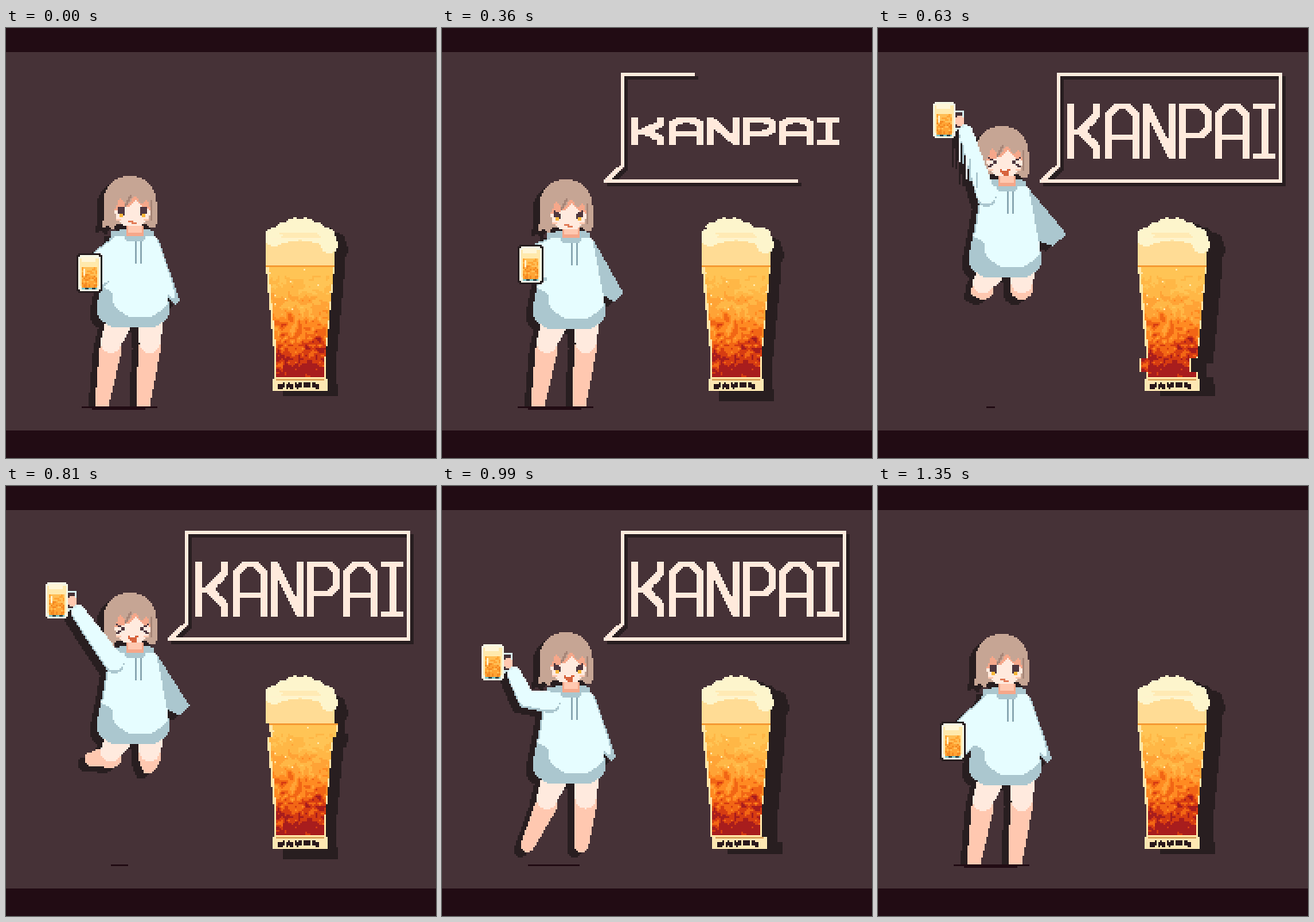
An HTML page with a canvas for the animation above (1440 ms loop, 500 px wide and 500 px high).

```html
<!DOCTYPE html>
<html lang="en">
<head>
<meta charset="utf-8">
<title>Kanpai</title>
<style>
html, body { margin: 0; width: 100%; height: 100%; overflow: hidden; background: #463237; }
canvas { display: block; width: 500px; height: 500px; image-rendering: pixelated; }
</style>
</head>
<body>
<canvas id="stage" width="250" height="250" role="img" aria-label="KANPAI"></canvas>
<script>
// Coordinates are in stage pixels; every art pixel covers 2 x 2 of them.
const STEP = 90, STEPS = 16;
const BG = '#463237', BAR = '#220c14', DARK = '#281e20', CREAM = '#ffeadc';
const SKIN = '#ffeade', BLUSH = '#ffc8b0', FLUSH = '#f5a78a', HAIR = '#c6a594', HAIR_DARK = '#a78678';
const CLOTH = '#e6fdff', FOLD = '#abc7cf', EYE = '#503840', IRIS = '#f8b73a';

const stage = document.getElementById('stage').getContext('2d');
const layer = () => {
  const c = document.createElement('canvas');
  c.width = c.height = 250;
  return c.getContext('2d');
};
const scene = layer(), tint = layer(), glass = layer();

const clamp = (v, lo = 0, hi = 1) => Math.max(lo, Math.min(hi, v));
const mix = (a, b, f) => a + (b - a) * f;

// ---- Pixel drawing ----
function box(g, color, x, y, w, h) {
  g.fillStyle = color;
  g.fillRect(Math.round(x / 2), Math.round(y / 2), Math.round(w / 2), Math.round(h / 2));
}

// Fills rows y0..y1 between left(y) and right(y).
function rows(g, color, y0, y1, left, right) {
  g.fillStyle = color;
  for (let r = Math.round(y0 / 2); r < Math.round(y1 / 2); r++) {
    const a = Math.round(left(r * 2 + 1) / 2);
    g.fillRect(a, r, Math.max(0, Math.round(right(r * 2 + 1) / 2) - a), 1);
  }
}

function disc(g, color, x, y, r) {
  const half = v => Math.sqrt(Math.max(0, r * r - (v - y) ** 2));
  rows(g, color, y - r, y + r, v => x - half(v), v => x + half(v));
}

function poly(g, color, ...p) {
  g.fillStyle = color;
  const ys = p.filter((_, i) => i % 2), n = p.length;
  for (let r = Math.floor(Math.min(...ys) / 2); r < Math.max(...ys) / 2; r++) {
    const y = r * 2 + 1, hits = [];
    for (let i = 0; i < n; i += 2) {
      const x0 = p[i], y0 = p[i + 1], x1 = p[(i + 2) % n], y1 = p[(i + 3) % n];
      if ((y0 <= y) !== (y1 <= y)) hits.push(x0 + (y - y0) / (y1 - y0) * (x1 - x0));
    }
    hits.sort((a, b) => a - b);
    for (let i = 0; i + 1 < hits.length; i += 2) {
      const a = Math.round(hits[i] / 2), b = Math.round(hits[i + 1] / 2);
      g.fillRect(a, r, b - a, 1);
    }
  }
}

// Calls put(x, y, part) along a polyline, up to the given share of its length.
function walk(p, share, put) {
  const dist = i => Math.hypot(p[i + 2] - p[i], p[i + 3] - p[i + 1]);
  let total = 0, done = 0;
  for (let i = 0; i + 3 < p.length; i += 2) total += dist(i);
  for (let i = 0; i + 3 < p.length; i += 2) {
    const d = dist(i);
    for (let s = 0; s <= d && done + s <= total * share; s++)
      put(mix(p[i], p[i + 2], s / d), mix(p[i + 1], p[i + 3], s / d), (done + s) / total);
    done += d;
  }
}
const line = (g, color, p, w, h = w, share = 1) =>
  walk(p, share, (x, y) => box(g, color, x, y, w, h));
const limb = (g, color, p, r0, r1) =>
  walk(p, 1, (x, y, f) => disc(g, color, x, y, mix(r0, r1, f)));

function shadow(src, dx, dy, limit = 500) {
  tint.globalCompositeOperation = 'copy';
  tint.drawImage(src.canvas, dx / 2, dy / 2);
  tint.globalCompositeOperation = 'source-in';
  box(tint, DARK, 0, 0, 500, 500);
  for (const c of [tint.canvas, src.canvas])
    stage.drawImage(c, 0, 0, 250, limit / 2, 0, 0, 250, limit / 2);
}

const clear = g => g.clearRect(0, 0, 250, 250);

const hash = (x, y) => {
  const s = Math.sin(x * 127.1 + y * 311.7) * 43758.5453;
  return s - Math.floor(s);
};
function noise(x, y) {
  const i = Math.floor(x), j = Math.floor(y), u = x - i;
  return mix(mix(hash(i, j), hash(i + 1, j), u), mix(hash(i, j + 1), hash(i + 1, j + 1), u), y - j);
}

// ---- Beer glass ----
function buildGlass() {
  const g = glass;
  const amber = ['#ffc455', '#ffb746', '#ffa336', '#ff8a22', '#f26615', '#d63c12', '#a81d1d'];
  const taper = y => 10 * clamp((y - 276) / 105);
  const left = y => 302 + taper(y), right = y => 382 - taper(y);

  rows(g, '#ffe6a8', 242, 408, left, right);
  rows(g, '#ffdc95', 248, 276, left, right);
  box(g, '#f59a34', 302, 276, 80, 2);
  for (let y = 278; y < 406; y += 2) {
    const v = (y - 278) / 128;
    for (let x = Math.ceil(left(y) / 2) * 2 + 2; x < right(y) - 2; x += 2) {
      const n = noise(x / 11, y / 9) * .5 + noise(x / 4, y / 4) * .5 - .5;
      const k = Math.floor((v + n * clamp(.15 + v, 0, .75)) * 7);
      const spark = v < .4 && hash(x, y) > .985;
      box(g, spark ? '#ffe6a8' : amber[clamp(k, 0, 6)], x, y, 2, 2);
    }
  }
  for (let x = 312; x < 376; x += 12)
    disc(g, '#fdf5cc', x, 234 + ((x - 342) / 10) ** 2, 14 - Math.abs(x - 342) / 10);
  disc(g, '#fdf5cc', 376, 252, 10);
  rows(g, '#ffeab4', 238, 246, y => 322 - y % 5, y => 360 + y % 7);
  box(g, '#fff3cc', 308, 244, 56, 2);

  box(g, '#fde7b2', 310, 408, 64, 14);
  box(g, '#d9a25c', 314, 408, 56, 2);
  for (let x = 316; x < 364; x += 2)
    if (x % 10 !== 4) box(g, '#2a181c', x, 412 + 2 * (hash(x, 1) > .7), 2, 6);
}

// A slipped strip runs down the glass twice per loop.
function strip(k) {
  const first = k < 8, i = k - (first ? 4 : 9);
  if (i < 0 || i > (first ? 3 : 2)) return null;
  return first ? { y: 216 + i * 56, dx: -8 } : { y: 276 + i * 66, dx: 4 };
}

function drawGlass(k) {
  clear(scene);
  scene.drawImage(glass.canvas, 0, 0);
  const s = strip(k);
  if (s) {
    scene.clearRect(0, s.y / 2, 250, 8);
    scene.drawImage(glass.canvas, 0, s.y / 2, 250, 8, s.dx / 2, s.y / 2, 250, 8);
  }
  const far = (k >> 1) % 2 === 1;
  shadow(scene, far ? 18 : 12, (k < 4) === far ? 12 : 6);
}

// ---- Speech bubble ----
const stem = x => [x, 88, x, 146];
const bar = (x, y, w) => [x, y, x + w, y];
const arch = x => [x, 146, x, 98, x + 10, 88, x + 22, 88, x + 32, 98, x + 32, 146];
const strokes = [
  stem(220), [250, 88, 250, 98, 232, 117, 250, 136, 250, 146], bar(220, 117, 12),
  arch(264), bar(264, 124, 32),
  stem(308), [308, 88, 338, 146], stem(338),
  stem(350), [350, 88, 372, 88, 380, 96, 380, 114, 372, 122, 350, 122],
  arch(392), bar(392, 124, 32),
  stem(445), bar(436, 88, 18), bar(436, 146, 18)
];

function drawBubble(k) {
  const drawn = clamp(Math.min((k - 2) * .275, (14.5 - k) * .4));
  const tall = clamp(Math.min((k - 3) * .45, (14 - k) * .6));
  if (!drawn) return;
  clear(scene);
  line(scene, CREAM, [188, 176, 466, 176, 466, 52], 4, 4, drawn);
  line(scene, CREAM, [188, 176, 208, 158, 208, 52, 466, 52], 4, 4, drawn);
  shadow(scene, 4, 4);
  if (tall) for (const p of strokes)
    line(stage, CREAM, p.map((v, i) => i % 2 ? mix(117, v, tall) : v), 7, 6);
}

// ---- Girl ----
// Mug path: step, x, y
const mugKeys = [[0, 84, 264], [2, 91, 262], [5, 90, 250], [7, 64, 86], [9, 46, 111], [11, 45, 184], [15, 74, 276], [16, 84, 264]];
function mugAt(k) {
  const i = mugKeys.findIndex(key => key[0] > k);
  const [t0, x0, y0] = mugKeys[i - 1], [t1, x1, y1] = mugKeys[i];
  const f = (k - t0) / (t1 - t0);
  return [mix(x0, x1, f), mix(y0, y1, f)].map(v => Math.round(v / 2) * 2);
}

function poseAt(k) {
  const air = k > 5 && k < 12;
  const jump = air ? 62 * Math.sin(Math.PI * ((k - 5.4) / 5.65) ** .75) : 0;
  const bend = air ? 0 : clamp(Math.min(k - 2, 14 - k), 0, 3);
  const swing = 17 * Math.sin(Math.PI * clamp((k - 2.5) / 8.5));
  const even = v => Math.round(v / 2) * 2;
  const [mx, my] = mugAt(k);
  return { air, jump, swing, mx, my, head: even(bend * 2 - jump), body: even(bend * .7 - jump),
    raised: k > 5 && k < 13, rising: air && k < 8, squint: k > 5 && k < 11,
    keen: k > 3 && k < 14, cheer: k > 4 && k < 13, bent: k === 11 || k === 12 };
}

function drawLegs(g, p) {
  const f = p.jump / 62, knee = 370 - 12 * f, foot = 440 - 18 * p.air - 60 * f;
  const falling = p.air && !p.rising, r = p.rising ? 3 : 8;
  const leg = (hipX, kneeX, footX, footY) => {
    limb(g, BLUSH, [kneeX, knee + 2, footX, footY], 13, r);
    limb(g, SKIN, [hipX, 342, kneeX, knee - 4], 15, 12);
  };
  leg(131, 122, falling ? 99 : 111, foot - 12 * f * falling);
  leg(168, 167, falling ? 162 + 5 * f : 159, foot);
}

function drawBody(g, swing) {
  const side = (y, top, hem) => mix(top, hem, clamp((y - 238) / 84));
  const round = (y, hem, r) => clamp(y - hem + r, 0, r) ** 2 / r;
  const tx = 202 + swing, ty = 316 - swing * 1.1;
  const sleeve = [168, 238, 178, 248, tx, ty, tx - 5 - swing * .6, ty + 6 + swing * .5, 180, 304];

  rows(g, FOLD, 236, 348, y => side(y, 122, 106) + round(y, 348, 18), y => side(y, 172, 190) - round(y, 348, 18));
  poly(g, FOLD, ...sleeve);
  rows(g, CLOTH, 242, 336,
    y => y < 298 ? side(y, 124, 108) : 108 + Math.min(16, (y - 298) * 1.6) + round(y, 336, 20),
    y => side(y, 174, 190) - round(y, 336, 22));
  if (swing < 4) poly(g, CLOTH, 168, 242, 178, 252, 194, 298, tx - 5, ty, 186, 308);
  rows(g, FOLD, 234, 248, y => 132 + (y - 234) * .6, y => 168 - (y - 234) * .6);
  rows(g, FLUSH, 230, 242, () => 139, () => 159);
  rows(g, BLUSH, 230, 238, () => 141, () => 157);
  for (const x of [150, 156]) box(g, '#8ba9b4', x, 248, 2, 26);
}

function drawHead(g, p) {
  const dome = y => 31 * Math.sqrt(1 - clamp((202 - y) / 30) ** 2);
  rows(g, HAIR, 172, 228, y => 144 - dome(y), y => 144 + dome(y));
  poly(g, HAIR, 113, 224, 130, 224, 124, 236, 120, 230, 112, 232);
  poly(g, HAIR, 162, 224, 175, 224, 174, 232, 166, 232);
  poly(g, FLUSH, 126, 212, 132, 198, 142, 206, 150, 194, 158, 206, 164, 198, 168, 212);
  poly(g, SKIN, 126, 212, 142, 208, 150, 200, 158, 208, 168, 212, 166, 222, 156, 231, 138, 231, 128, 222);
  line(g, HAIR_DARK, [144, 194, 138, 206], 2);
  line(g, HAIR_DARK, [168, 200, 168, 222], 2);

  for (const s of [-1, 1]) {
    const at = d => 147 + s * d - 1;
    if (p.squint) line(g, EYE, [at(18), 208, at(10), 213, at(18), 218], 2);
    else {
      poly(g, EYE, 147 + s * 18, 208, 147 + s * 9, p.keen ? 212 : 208, 147 + s * 9, 218, 147 + s * 15, 220);
      box(g, IRIS, at(13) - 1, 216, 4, 4);
    }
    box(g, BLUSH, at(16) - 2, 222, 6, 2);
  }
  if (p.cheer) {
    poly(g, '#d8643e', 141, 222, 154, 222, 151, 230, 146, 230);
    box(g, '#fff4ec', 144, 222, 6, 2);
  } else line(g, '#e27c58', [142, 224, 150, 226], 2);
}

function drawMug(g, x, y, raised) {
  if (raised) {
    line(g, '#d5eef0', [x + 24, y + 10, x + 33, y + 10, x + 33, y + 28, x + 24, y + 32], 2);
    disc(g, BLUSH, x + 31, y + 22, 6);
  } else {
    box(g, DARK, x - 2, y, 30, 42);
    box(g, DARK, x, y - 2, 26, 46);
  }
  box(g, '#f4f6e4', x, y + 2, 26, 38);
  box(g, '#f4f6e4', x + 2, y, 22, 42);
  box(g, '#ffe9ac', x + 2, y + 4, 22, 32);
  box(g, '#fff6d8', x + 4, y + 2, 16, 6);
  for (let j = 0; j < 12; j++)
    for (let i = 0; i < 9; i++) {
      const n = hash(i + 4, j + 9) + j * .05;
      box(g, n > 1 ? '#f58a22' : n > .55 ? '#ffa434' : '#ffbe55', x + 4 + i * 2, y + 13 + j * 2, 2, 2);
    }
  box(g, '#fff0c8', x + 6, y + 16, 2, 8);
  box(g, '#7fc4c4', x + 4, y + 38, 18, 2);
  for (const d of [8, 16]) box(g, '#2f4a50', x + d, y + 38, 4, 2);
}

function drawArm(g, p) {
  const { mx, my, body } = p, hx = mx + 38, hy = my + 34;
  if (!p.raised) {
    poly(g, FOLD, 128, 240 + body, mx + 16, my - 2, mx + 26, my + 40, 122, 292 + body);
    poly(g, CLOTH, 128, 242 + body, mx + 16, my, mx + 26, my + 36, 126, 290 + body);
    return;
  }
  const path = [126, 252 + body, ...(p.bent ? [98, 248 + body] : []), hx, hy];
  limb(g, FOLD, path.map((v, i) => v + 3 * (i % 2)), 11, 8);
  limb(g, CLOTH, path, 11, 8);
  if (p.rising)
    for (let i = 0; i < 6; i++)
      box(g, i % 2 ? FOLD : CLOTH, hx - 8 + i * 4, hy + 8 + i * 8, 2, 16 + hash(i, 3) * 20);
}

function drawGirl(k) {
  const p = poseAt(k), g = scene;
  const at = (dy, paint) => {
    g.save();
    g.translate(0, dy / 2);
    paint();
    g.restore();
  };
  clear(g);
  at(p.air ? p.body : 0, () => drawLegs(g, p));
  at(p.body, () => drawBody(g, p.swing));
  at(p.head, () => drawHead(g, p));
  drawArm(g, p);
  shadow(g, -8, 6, 440);
  drawMug(stage, p.mx, p.my, p.raised);

  const width = 62 - p.jump * .88;
  if (!p.air) box(stage, BAR, 88, 440, 88, 2);
  box(stage, BAR, 131 - width / 2, 440, width, p.air ? 2 : 4);
}

function draw(k) {
  box(stage, BG, 0, 0, 500, 500);
  box(stage, BAR, 0, 0, 500, 28);
  box(stage, BAR, 0, 468, 500, 32);
  drawGlass(k);
  drawBubble(k);
  drawGirl(k);
}

buildGlass();
let shown = -1;
function tick() {
  const k = Math.floor(performance.now() / STEP) % STEPS;
  if (k !== shown) draw(shown = k);
  requestAnimationFrame(tick);
}
tick();
</script>
</body>
</html>
```
